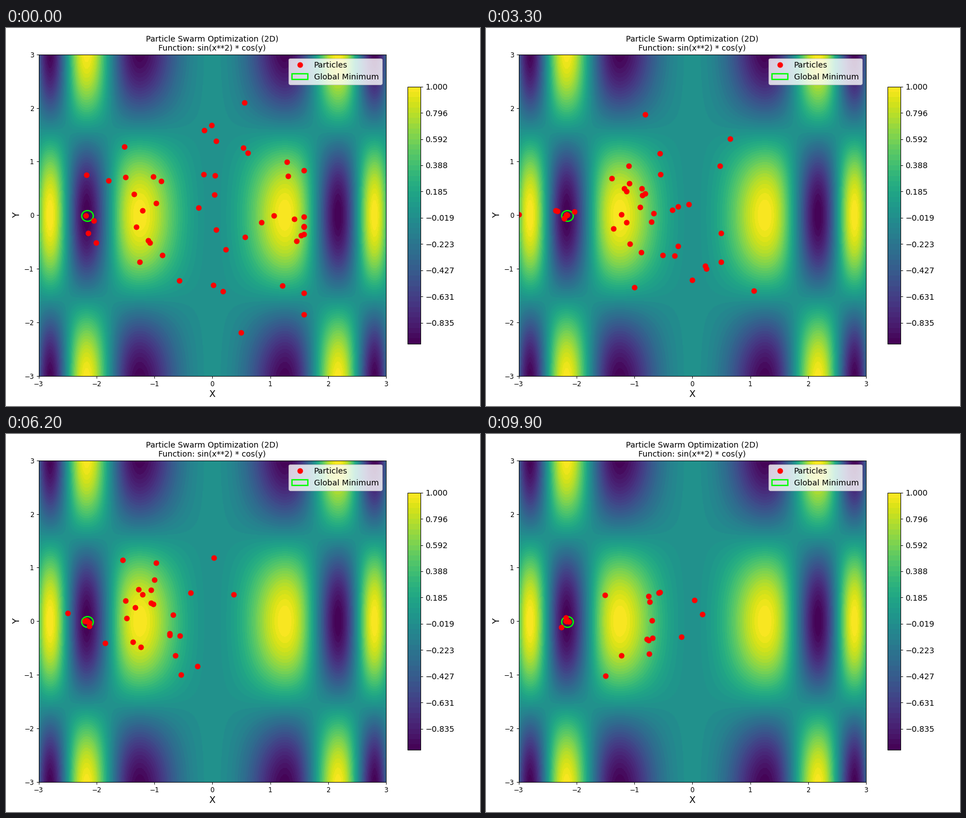
These frames come from a looping animation (837x669 px, 10000 ms). A matplotlib script:

```python
import numpy as np
import matplotlib.pyplot as plt
from matplotlib.animation import FuncAnimation
from matplotlib.patches import Circle

W, H, DPI = 837, 669, 83.7
EPS = 1e-6  # keeps the pixel size from rounding down
FRAMES, COUNT = 100, 50
BEST = np.array([-2.17, 0.0])

plt.rcParams["font.family"] = "DejaVu Sans"


def swarm(seed=7):
    """Particles roam around an anchor until each is caught by the minimum."""
    rng = np.random.default_rng(seed)
    rank = (np.arange(COUNT) + 0.5) / COUNT
    caught = -80 * np.log(1 - rank)  # the free ones thin out exponentially

    start_x = np.minimum(rng.uniform(-2.2, 2.2, COUNT), 1.58)
    start_y = np.clip(rng.normal(0, 1.1, COUNT), -2.3, 2.1)
    pos = np.column_stack([start_x, start_y])
    vel = np.zeros_like(pos)
    anchor = np.column_stack([0.3 - 1.3 * rank + rng.normal(0, 0.35, COUNT),
                              rng.normal(0, 0.65, COUNT)])
    path = []
    for n in range(FRAMES):
        path.append(pos.copy())
        goal = np.where((n < caught)[:, None], anchor, BEST)
        reach = np.linalg.norm(pos - BEST, axis=1, keepdims=True)
        jolt = 0.15 * reach * rng.normal(size=pos.shape)
        vel = 0.5 * vel + 0.35 * (goal - pos) + jolt
        pos = pos + vel
    return np.array(path)


grid = np.linspace(-3, 3, 200)
X, Y = np.meshgrid(grid, grid)
Z = np.sin(X**2) * np.cos(Y)
levels = np.linspace(Z.min(), Z.max(), 50)

fig, ax = plt.subplots(figsize=((W + EPS) / DPI, (H + EPS) / DPI), dpi=DPI)
field = ax.contourf(X, Y, Z, levels=levels, cmap="viridis")

marks = levels[4::5]
bar = fig.colorbar(field, ax=ax, shrink=0.8, ticks=marks)
bar.ax.set_yticklabels([f"{v:.3f}".replace("-", "\u2212") for v in marks])
bar.ax.tick_params(labelsize=12)

path = swarm()
dots, = ax.plot(*path[0].T, "ro", markersize=7.5, label="Particles")
row, col = np.unravel_index(Z.argmin(), Z.shape)
ax.add_patch(Circle((-abs(grid[col]), -abs(grid[row])), 0.1, fill=False,
                    edgecolor="lime", linewidth=2, label="Global Minimum"))

ax.set(xlim=(-3, 3), ylim=(-3, 3), xticks=range(-3, 4), yticks=range(-3, 4))
ax.set_title("Particle Swarm Optimization (2D)\nFunction: sin(x**2) * cos(y)",
             fontsize=12)
ax.set_xlabel("X", fontsize=14)
ax.set_ylabel("Y", fontsize=14)
ax.legend(loc="upper right", fontsize=12)
fig.tight_layout()


def update(n):
    dots.set_data(*path[n].T)
    return dots,


anim = FuncAnimation(fig, update, frames=FRAMES, interval=100,
                     repeat=True, repeat_delay=0)
plt.show()
```
